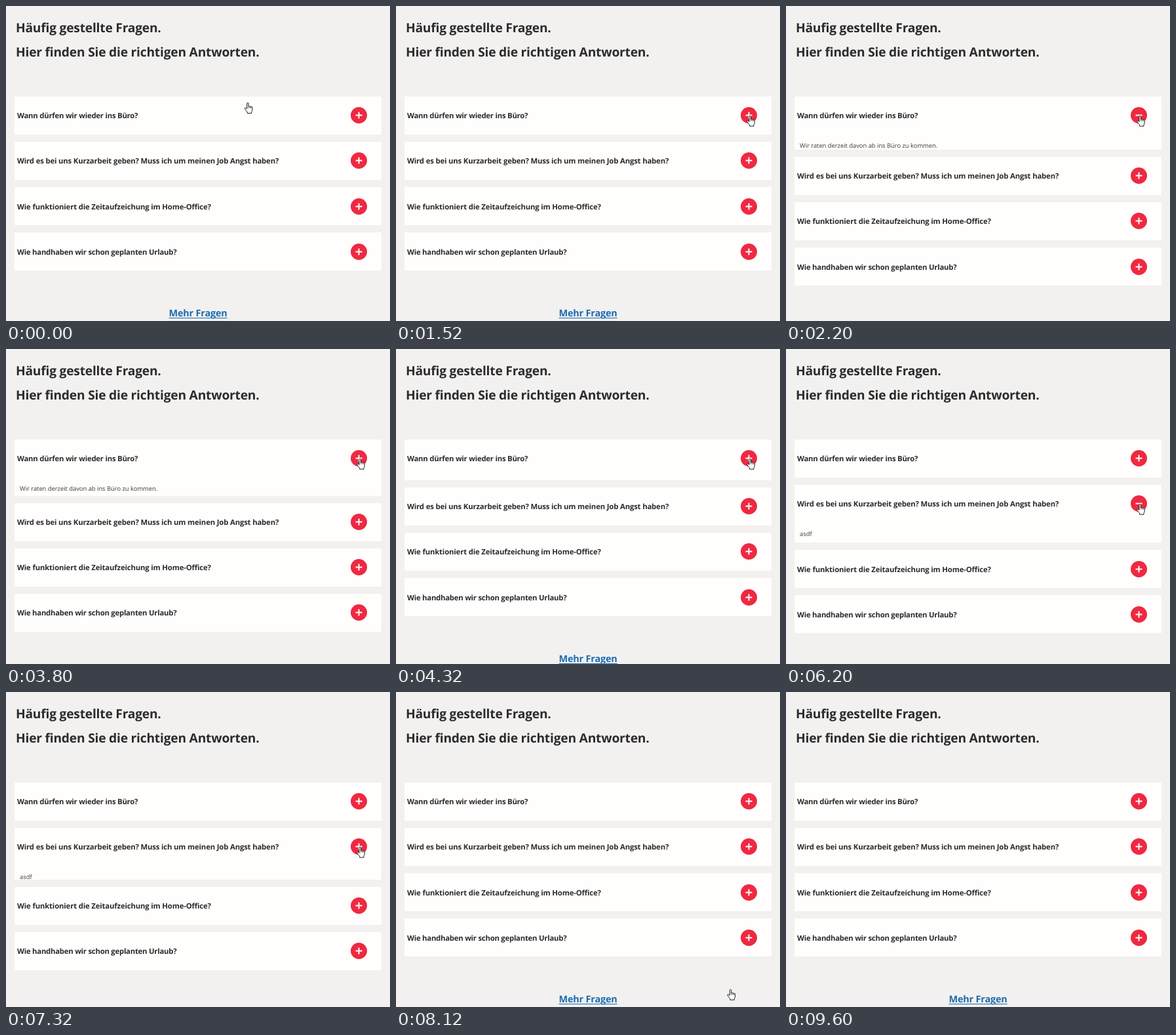
These frames come from a looping animation (586x480 px, 9720 ms). An HTML page:

```html
<!DOCTYPE html>
<html lang="de">
<head>
<meta charset="utf-8">
<title>Häufig gestellte Fragen</title>
<style>
  html, body { margin: 0; width: 100%; height: 100%; overflow: hidden; background: #f2f1ef; }
  #stage {
    position: relative; width: 586px; height: 480px; overflow: hidden;
    background: #f2f1ef; color: #2b2b2d;
    font-family: "Open Sans", "Noto Sans", sans-serif;
    text-rendering: geometricPrecision; white-space: nowrap;
  }
  h1, h2 {
    position: absolute; left: 15px; margin: 0; letter-spacing: -.2px;
    font: 700 19.2px/30px "Open Sans", "Noto Sans", sans-serif;
  }
  h1 { top: 17.8px; }
  h2 { top: 55px; }
  #faq { position: absolute; left: 13px; top: 137.8px; width: 560px; }
  .card { position: relative; height: 58.3px; margin-bottom: 10.8px; overflow: hidden; background: #fffefd; }
  .question { position: absolute; left: 4px; top: 20.6px; font-size: 11.3px; font-weight: 700; line-height: 20px; }
  .answer { position: absolute; left: 8px; top: 67.6px; font-size: 9.35px; line-height: 16px; color: #3a3a3a; }
  .icon { position: absolute; left: 513px; top: 16.55px; width: 25px; height: 25px; }
  .icon path { stroke: #fff; stroke-width: 2; }
  .link {
    position: absolute; margin: 45.2px 0 0 235.5px; color: #1c6bb0;
    font-size: 14.4px; font-weight: 700; line-height: 20px; letter-spacing: -.14px;
    text-decoration: underline 1.4px; text-underline-offset: 2px;
  }
  #hand { position: absolute; left: 0; top: 0; width: 14px; height: 18px; overflow: visible; }
</style>
</head>
<body>
<div id="stage">
  <h1>Häufig gestellte Fragen.</h1>
  <h2>Hier finden Sie die richtigen Antworten.</h2>
  <div id="faq"></div>
  <svg id="hand" viewBox="0 0 14 18">
    <path fill="#fff" stroke="#1a1a1a" stroke-width="1" stroke-linejoin="round"
      d="M4.2 9.6V1.8a1.2 1.2 0 0 1 2.4 0V6.2a1.1 1.1 0 0 1 2.1.4a1 1 0 0 1 1.9.5a.9.9 0 0 1 1.8.6V11.2c0 1.8-1.2 2.6-1.2 3.6v1.6H4.8v-1.4C4.4 13.6 2 11.6.9 9.4c-.5-1.2.9-1.8 1.8-.9z"/>
    <path fill="none" stroke="#1a1a1a" stroke-width=".7" d="M6.6 6.2v2.6M8.7 6.6v2.4M10.6 7.1v2.1"/>
  </svg>
</div>
<script>
  const LOOP = 9720;
  const SLIDE = 0.85;   // seconds to open or close a card
  const EXTRA = 30;     // height an answer adds
  const BASE = 58.3;

  const items = [
    { q: 'Wann dürfen wir wieder ins Büro?', track: -.21,
      a: 'Wir raten derzeit davon ab ins Büro zu kommen.', open: 1.625, close: 3.65 },
    { q: 'Wird es bei uns Kurzarbeit geben? Muss ich um meinen Job Angst haben?', track: -.145,
      a: 'asdf', open: 5.27, close: 6.98 },
    { q: 'Wie funktioniert die Zeitaufzeichung im Home-Office?', track: -.14 },
    { q: 'Wie handhaben wir schon geplanten Urlaub?', track: -.22 }
  ];

  // Pointer stops: seconds, x, y
  const stops = [
    [0, 363.5, 147], [.1, 366, 148], [.2, 366, 148], [1.3, 534.8, 166.7],
    [4.5, 534.8, 166.7], [5.1, 534.8, 235.7], [7.8, 534.8, 235.7], [8.2, 500, 490]
  ];

  const faq = document.getElementById('faq');
  const hand = document.getElementById('hand');

  for (const item of items) {
    const card = document.createElement('div');
    card.className = 'card';
    card.innerHTML = `
      <div class="question" style="letter-spacing:${item.track}px">${item.q}</div>
      <svg class="icon" viewBox="0 0 25 25">
        <circle cx="12.5" cy="12.5" r="12.5" fill="#ee2941"/>
        <path d="M7.5 12.5h10"/><path class="bar" d="M12.5 7.5v10"/>
      </svg>
      ${item.a ? `<div class="answer">${item.a}</div>` : ''}`;
    faq.append(card);
    item.card = card;
    item.bar = card.querySelector('.bar');
  }
  faq.insertAdjacentHTML('beforeend', '<span class="link">Mehr Fragen</span>');

  function ease(p) {
    p = Math.min(1, Math.max(0, p));
    return .5 - .5 * Math.cos(Math.PI * p);
  }

  function pointerAt(s) {
    const i = stops.findIndex(p => p[0] > s);
    if (i < 0) return stops[stops.length - 1].slice(1);
    const [t0, x0, y0] = stops[i - 1], [t1, x1, y1] = stops[i];
    const p = ease((s - t0) / (t1 - t0));
    return [x0 + (x1 - x0) * p, y0 + (y1 - y0) * p];
  }

  function draw(now) {
    const t = now % LOOP;
    // Ten pictures a second, held alternately for 120 and 80 ms
    const s = (2 * Math.floor(t / 200) + (t % 200 >= 120 ? 1 : 0)) / 10;

    for (const { card, bar, a, open, close } of items) {
      if (!a) continue;
      const amount = ease((s - open) / SLIDE) - ease((s - close) / SLIDE);
      card.style.height = BASE + EXTRA * amount + 'px';
      bar.style.display = s >= open && s < close ? 'none' : '';
    }
    const [x, y] = pointerAt(s);
    hand.style.transform = `translate(${x}px, ${y}px)`;
  }

  const start = performance.now();
  function tick() {
    draw(performance.now() - start);
    requestAnimationFrame(tick);
  }
  tick();
</script>
</body>
</html>
```
